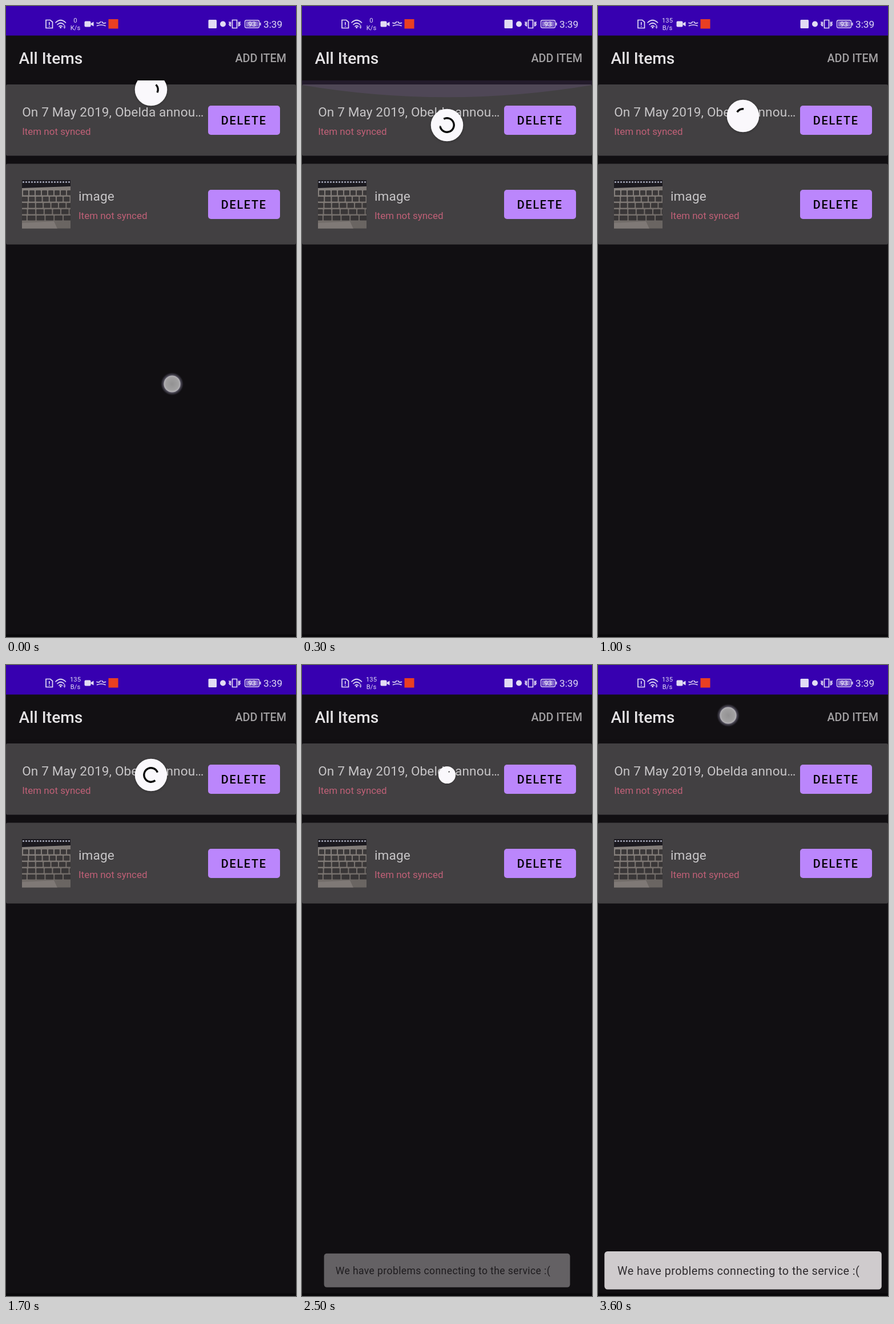
Write an HTML page that moves like this. It is 508x1102 px and loops after 3700 ms.

```html
<!DOCTYPE html>
<html lang="en">
<head>
<meta charset="utf-8">
<title>All Items</title>
<style>
  html, body { margin: 0; width: 100%; height: 100%; overflow: hidden; background: #110f12; }
  svg { display: block; width: 100%; height: 100%; }
  text { font-family: Roboto, sans-serif; white-space: pre; }
  .medium { font-weight: 500; }
  .name { font-size: 22.6px; letter-spacing: .12px; fill: #c7c5c7; }
  .state { font-size: 16.94px; fill: #c06077; }
  .button { font-size: 19.76px; letter-spacing: 1.76px; }
  .speed { font-size: 11.2px; text-anchor: middle; }
  .line { fill: none; stroke: #e2dcf4; stroke-width: 1.7; stroke-linecap: round; }
  #wheel { filter: drop-shadow(0 1.5px 2px rgba(0, 0, 0, .28)); }
</style>
</head>
<body>
<svg viewBox="0 0 508 1102">
  <defs>
    <radialGradient id="halo">
      <stop offset=".68" stop-color="#918d9f" stop-opacity=".75"/>
      <stop offset="1" stop-color="#6a6680" stop-opacity="0"/>
    </radialGradient>
    <radialGradient id="dot">
      <stop offset="0" stop-color="#939293"/>
      <stop offset=".75" stop-color="#a09fa0"/>
      <stop offset="1" stop-color="#b5b3b7"/>
    </radialGradient>
    <linearGradient id="desk" x2=".3" y2="1">
      <stop offset="0" stop-color="#8d8885"/>
      <stop offset=".7" stop-color="#77716d"/>
      <stop offset="1" stop-color="#6a6562"/>
    </linearGradient>
    <clipPath id="thumb"><rect x="28" y="304" width="85" height="84.5"/></clipPath>
    <g id="delete">
      <rect x="354" y="174" width="126" height="51" rx="5" fill="#bb86fc"/>
      <text class="button medium" x="376.8" y="207">DELETE</text>
    </g>
  </defs>

  <rect width="508" height="1102" fill="#110f12"/>
  <rect y="1097.5" width="508" height="5" fill="#09080a"/>

  <g fill="#424042">
    <rect y="137" width="508" height="124.5" rx="2.8"/>
    <rect y="275.5" width="508" height="141" rx="2.8"/>
  </g>
  <text class="name" x="28.2" y="193">On 7 May 2019, Obelda annou…</text>
  <text class="state" x="28.2" y="224.7">Item not synced</text>
  <text class="name" x="127" y="340">image</text>
  <text class="state" x="127" y="371.7">Item not synced</text>
  <use href="#delete"/>
  <use href="#delete" y="147"/>

  <g clip-path="url(#thumb)">
    <rect x="28" y="304" width="85" height="85" fill="url(#desk)"/>
    <path d="M28 304H113V315L28 318Z" fill="#1b191f"/>
    <path d="M29 307.5H113" stroke="#a5a8b9" stroke-width="2.5" stroke-dasharray="3 2"/>
    <g id="keys" fill="#2b292b" opacity=".8"></g>
    <path d="M28 379L84 376L90 389H28Z" fill="#7f7976"/>
  </g>

  <path id="glow" fill="#bb86fc"/>
  <g id="wheel">
    <circle r="28.3" fill="#faf8fc"/>
    <path id="arc" fill="none" stroke="#080808" stroke-width="3.4"/>
    <path id="arrow" d="M-5.5 0H5.5L0 6Z" fill="#080808"/>
  </g>

  <rect y="51" width="508" height="79" fill="#121013"/>
  <text class="medium" x="22.6" y="101.3" font-size="28.2" fill="#e5e3e5">All Items</text>
  <text class="medium" x="491" y="98" font-size="19.76" fill="#a19fa1" text-anchor="end">ADD ITEM</text>

  <rect width="508" height="51.6" fill="#3700b0"/>
  <g fill="#e2dcf4">
    <path class="line" d="M70 24.5H77.5L81.5 28V38.5H70Z"/>
    <path class="line" d="M75.8 28.5V32.5M75.8 35.3V35.5"/>
    <path class="line" d="M87 29Q95.5 20.5 104.5 29M90 32.5Q95.7 27 101.5 32.5M93 35.7Q95.7 33 98.5 35.7"/>
    <circle cx="95.7" cy="37.5" r="1.5"/>
    <path d="M100.5 36L102.5 33.5L104.5 36ZM100.5 37L102.5 39.5L104.5 37Z"/>
    <text id="amount" class="speed" x="121.5" y="28.7"></text>
    <text id="unit" class="speed" x="121.5" y="42"></text>
    <rect x="137.5" y="26.5" width="11" height="10" rx="2"/>
    <path d="M148.5 30.5L153.5 27.5V35.5L148.5 32.5Z"/>
    <path class="line" d="M159 29.5Q164 31.5 165.5 27.5M174.5 29.5Q169.5 31.5 168 27.5M159.5 34.5Q167 31.5 174 34.5"/>
    <rect x="179.5" y="23" width="17" height="16.5" fill="#ea3f22"/>
    <rect x="354.5" y="24" width="14.5" height="15" rx="1.5"/>
    <circle cx="380" cy="31.5" r="5"/>
    <path class="line" d="M396.5 24.5H404.5V38.5H396.5ZM393.5 28V35M407.5 28V35M391 28L391.8 30L391 32L391.8 34M410 28L409.2 30L410 32L409.2 34"/>
    <rect x="418.5" y="25" width="25" height="13" rx="2.5" fill="none" stroke="#e2dcf4" stroke-width="1.3"/>
    <rect x="420.5" y="27" width="21" height="9" fill="#8b70cf"/>
    <rect x="444.5" y="29" width="2" height="5"/>
    <text class="medium" x="431" y="35.7" font-size="12" text-anchor="middle">93</text>
    <text x="451" y="37.6" font-size="17.2">3:39</text>
  </g>

  <g id="snack">
    <rect x="11.3" y="1024" width="485.5" height="66.6" rx="5.5" fill="#cfcbcd"/>
    <text x="34" y="1065.3" font-size="19.76" letter-spacing=".47" fill="#2f2c2f">We have problems connecting to the service :(</text>
  </g>
  <g id="touch">
    <circle r="20" fill="url(#halo)"/>
    <circle r="14.5" fill="url(#dot)"/>
  </g>
</svg>

<script>
const LOOP = 3700, STEP = 100;
const PULLED = 200, SETTLED = 400, SHRINK = 430, SPIN = 1130, DONE = 2430;
const TURN = 1332, SPAN = 278, MIN = 12;
const RING = 12.2;

const el = Object.fromEntries([...document.querySelectorAll('[id]')].map(e => [e.id, e]));
const set = (node, attrs) => { for (const k in attrs) node.setAttribute(k, attrs[k]); };
const clamp = v => Math.min(1, Math.max(0, v));
const part = (t, from, to) => clamp((t - from) / (to - from));
const mix = (a, b, k) => a + (b - a) * k;
const polar = deg => {
  const a = deg * Math.PI / 180;
  return [RING * Math.cos(a), RING * Math.sin(a)];
};

// cubic-bezier(.4, 0, .2, 1)
function ease(x) {
  let lo = 0, hi = 1;
  for (let i = 0; i < 24; i++) {
    const u = (lo + hi) / 2, v = 1 - u;
    if (1.2 * v * v * u + .6 * v * u * u + u ** 3 < x) lo = u; else hi = u;
  }
  return lo * lo * (3 - 2 * lo);
}

// Start and end of the ring in degrees, clockwise from three o'clock.
function ringAngles(t) {
  if (t < SHRINK) {
    const k = part(t, 0, PULLED), start = mix(-45, -118, k);
    return [start, start + mix(70, 287, k)];
  }
  if (t < SPIN) {
    const k = part(t, SHRINK, SPIN), end = mix(169, 300, k);
    return [end - mix(287, MIN, k), end];
  }
  const p = (t - SPIN) / TURN % 1;
  const base = 300 - MIN + 291.6 * p;
  return p < .5
    ? [base, base + MIN + SPAN * ease(2 * p)]
    : [base + SPAN * ease(2 * p - 1), base + SPAN + MIN];
}

function drawWheel(t) {
  const back = 1 - (1 - part(t, PULLED, SETTLED)) ** 2;
  const y = t < PULLED ? mix(146, 256, t / PULLED) : mix(256, 192, back);
  const scale = 1 - part(t, DONE, DONE + 150);
  set(el.wheel, { transform: `translate(254 ${y}) scale(${scale})`, opacity: scale ? 1 : 0 });

  const [start, end] = ringAngles(t);
  const [x2, y2] = polar(end);
  set(el.arc, { d: `M${polar(start)}A${RING} ${RING} 0 ${+(end - start > 180)} 1 ${x2} ${y2}` });
  const head = t < PULLED ? mix(.1, 1, t / PULLED) : 1 - back;
  set(el.arrow, { transform: `translate(${x2} ${y2}) rotate(${end}) scale(${head})` });
}

function drawGlow(t) {
  const grow = part(t, 0, PULLED), fade = 1 - part(t, PULLED, 700);
  const side = mix(130, 138, grow), dip = mix(130, 180, grow) + 3 * (1 - fade);
  set(el.glow, {
    d: `M0 130V${side}Q254 ${dip} 508 ${side}V130Z`,
    opacity: .13 * grow * fade
  });
}

function drawTouch(t) {
  const k = part(t, 0, PULLED), pull = t <= PULLED;
  const x = pull ? mix(291, 278, k) : 228;
  const y = pull ? mix(660, 1072, 1 - (1 - k) ** 1.2) : 88;
  set(el.touch, { transform: `translate(${x} ${y})`, opacity: +(pull || t >= 3500) });
}

function draw(t) {
  drawGlow(t);
  drawWheel(t);
  drawTouch(t);
  const shown = part(t, DONE, DONE + 160), size = mix(.8, 1, shown);
  set(el.snack, {
    opacity: shown,
    transform: `translate(254 1057) scale(${size}) translate(-254 -1057)`
  });
  const online = t >= 700;
  el.amount.textContent = online ? '135' : '0';
  el.unit.textContent = online ? 'B/s' : 'K/s';
}

function addKeys() {
  let shapes = '';
  for (let row = 0; row < 5; row++) {
    const w = 9 + row * 1.2, y = 322 + row * 11;
    for (let i = -1; i < 9; i++) {
      const x = 30 + i * (w + 2) - row * 2;
      shapes += `<rect x="${x}" y="${y}" width="${w}" height="8.4" rx="1.2"/>`;
    }
  }
  el.keys.innerHTML = shapes;
}

addKeys();
const began = performance.now();
function frame() {
  const t = (performance.now() - began) % LOOP;
  draw(Math.floor(t / STEP) * STEP);
  requestAnimationFrame(frame);
}
frame();
</script>
</body>
</html>
```
